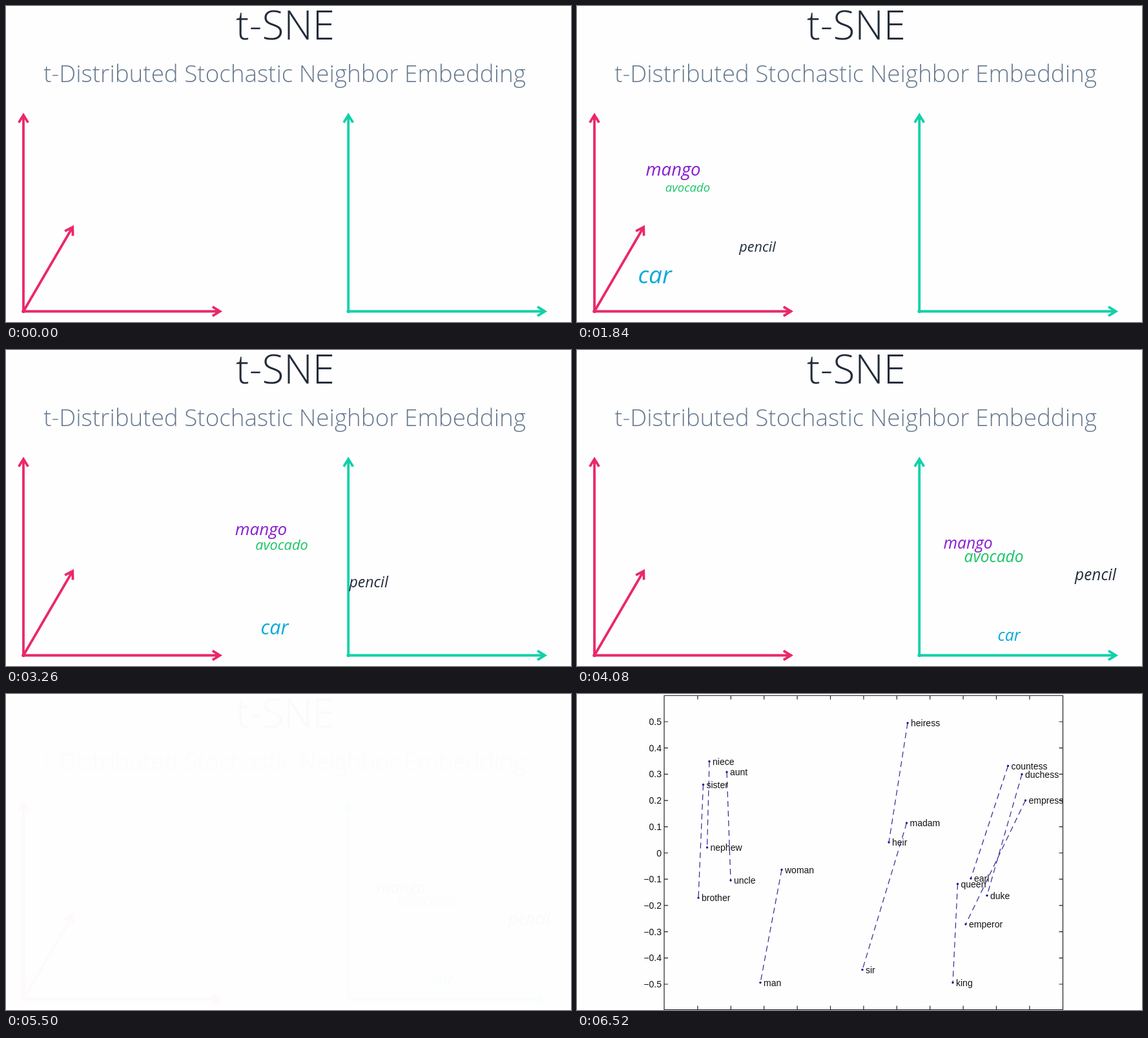
Animation, 875 px wide and 490 px high, one loop 7340 ms. Source, as an HTML page:

```html
<!DOCTYPE html>
<html lang="en">
<head>
<meta charset="utf-8">
<title>t-SNE</title>
<style>
  html, body { margin: 0; height: 100%; overflow: hidden; background: #fefefe; }
  svg { display: block; width: 100vw; height: 100vh; }
  text { white-space: pre; }
  #scene text { font-family: "Open Sans", sans-serif; text-anchor: middle; }
  #scene .head { font-weight: 300; }
  #words text { font-style: italic; }
  #axes path { fill: none; stroke-width: 3.8; }
  #chart { font: 14px "Liberation Sans", Arial, sans-serif; fill: #111; }
  #chart path { fill: none; stroke: #222; stroke-width: 1.2; }
  #chart .pair { stroke: #2c2796; stroke-dasharray: 9 6; }
  #chart circle { fill: #1c1890; }
  #chart .tick { text-anchor: end; }
</style>
</head>
<body>
<svg viewBox="0 0 875 490">
  <g id="scene">
    <text class="head" x="432.4" y="52.3" font-size="61.8" fill="#222b39">t-SNE</text>
    <text class="head" x="431.6" y="118" font-size="36.8" fill="#687a90">t-Distributed Stochastic Neighbor Embedding</text>
    <g id="axes"></g>
    <g id="words"></g>
  </g>
  <g id="chart"></g>
</svg>
<script>
const LOOP = 7340, STEP = 203.7;
const byId = id => document.getElementById(id);

function add(parent, tag, attrs, text = '') {
  const el = document.createElementNS('http://www.w3.org/2000/svg', tag);
  for (const key in attrs) el.setAttribute(key, attrs[key]);
  el.textContent = text;
  return parent.appendChild(el);
}

// Arrows
function arrow(color, x, y, dx, dy) {
  const length = Math.hypot(dx, dy), angle = Math.atan2(dy, dx) * 180 / Math.PI;
  add(byId('axes'), 'path', {
    d: `M0 0H${length - 2.6}m-11.6 -7.2l11.6 7.2l-11.6 7.2`,
    stroke: color, transform: `translate(${x} ${y}) rotate(${angle})`
  });
}
const PINK = '#ea2868', TEAL = '#10d1a9';
for (const [color, x] of [[PINK, 27], [TEAL, 530.2]]) {
  arrow(color, x, 473.5, 0, -307);
  arrow(color, x, 473.5, 307, 0);
  add(byId('axes'), 'circle', { cx: x, cy: 473.5, r: 2.8, fill: color });
}
arrow(PINK, 27, 473.5, 77.5, -133);

// Words travel and resize from one plot to the other: [x, baseline, size]
const words = [
  ['mango', '#8a1fd0', [149, 262.8, 27.7], [612, 309, 24.7]],
  ['avocado', '#1cc568', [171.5, 288, 18.6], [652.3, 330, 24.7]],
  ['pencil', '#222c3c', [279.5, 381, 21.6], [810.5, 356.5, 24.6]],
  ['car', '#0eabd6', [120.5, 430, 37], [676.8, 451, 24.7]]
].map(([name, fill, from, to]) => ({ from, to, el: add(byId('words'), 'text', { fill }, name) }));

// Chart
const chart = byId('chart');
let ticks = 'M135 2.5H752.5V489.5H135Z';
for (let i = 0; i < 11; i++) {
  const x = 186.9 + i * 51.4, y = 43 + i * 40.7;
  ticks += `M${x} 2.5v6M${x} 489.5v-6M135 ${y}h6M752.5 ${y}h-6`;
  const value = (5 - i) / 10;
  add(chart, 'text', { class: 'tick', x: 131, y: y + 5 }, String(value).replace('-', '−'));
}
add(chart, 'path', { d: ticks });

function point(name, x, y) {
  add(chart, 'circle', { cx: x, cy: y, r: 1.7 });
  add(chart, 'text', { x: x + 5, y: y + 5 }, name);
}
for (const [a, x1, y1, b, x2, y2] of [
  ['niece', 205, 104.5, 'nephew', 201.5, 238],
  ['aunt', 232, 121, 'uncle', 238, 289],
  ['sister', 195.5, 140.5, 'brother', 188, 316],
  ['woman', 317, 272.5, 'man', 284, 447.5],
  ['heiress', 512, 45, 'heir', 483, 230],
  ['madam', 510.5, 200, 'sir', 442, 427.5],
  ['countess', 667.5, 111.5, 'earl', 610, 286],
  ['duchess', 689, 124.5, 'duke', 635, 312.5],
  ['empress', 694.5, 165, 'emperor', 602, 357],
  ['queen', 589.5, 294.5, 'king', 582, 447.5]
]) {
  add(chart, 'path', { class: 'pair', d: `M${x1} ${y1}L${x2} ${y2}` });
  point(a, x1, y1);
  point(b, x2, y2);
}

const progress = (t, start, duration) => Math.min(1, Math.max(0, (t - start) / duration));

function draw(now) {
  // The picture advances about five times a second
  const t = Math.floor(now % LOOP / STEP) * STEP;
  const move = (1 - Math.cos(Math.PI * progress(t, 2212, 2014))) / 2;
  for (const { from, to, el } of words) {
    const [x, y, size] = from.map((v, i) => v + (to[i] - v) * move);
    el.setAttribute('x', x);
    el.setAttribute('y', y);
    el.setAttribute('font-size', size);
  }
  byId('words').setAttribute('opacity', progress(t, 500, 1000));
  byId('scene').setAttribute('opacity', 1 - progress(t, 4824, 690));
  chart.setAttribute('opacity', progress(t, 5824, 690));
}

let start;
function tick(now) {
  start ??= now;
  draw(now - start);
  requestAnimationFrame(tick);
}
draw(0);
requestAnimationFrame(tick);
</script>
</body>
</html>
```
